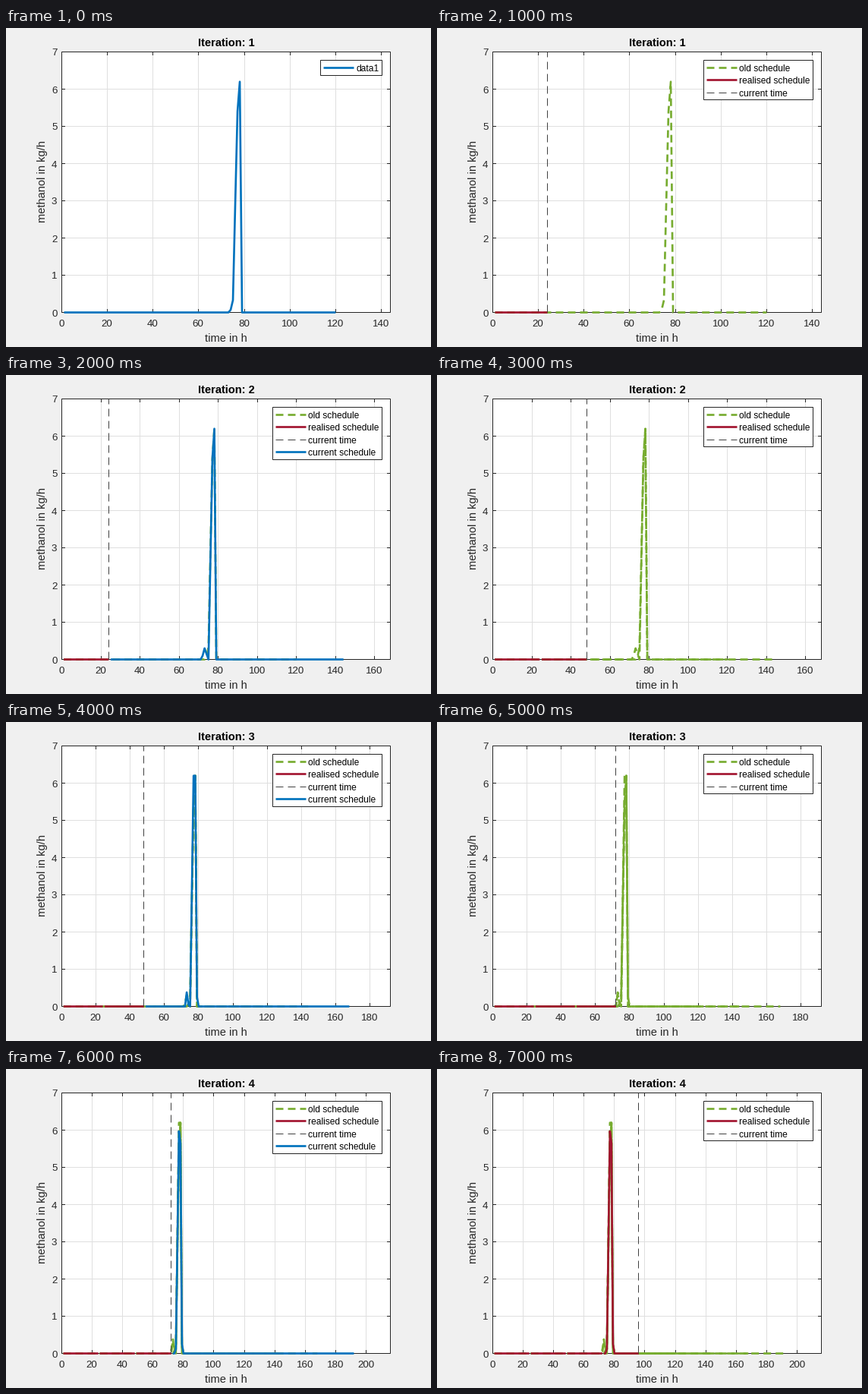
These frames come from a looping animation (560 px wide and 420 px high, 8 s). A matplotlib script:

```python
import math

import matplotlib.pyplot as plt
import numpy as np
from matplotlib.animation import FuncAnimation
from matplotlib.patches import Rectangle

W, H, DPI = 560, 420, 100
LEFT, RIGHT, TOP, BOTTOM = 73.5, 506.5, 31.5, 374.5
Y_MAX = 7
DAY, HORIZON = 24, 120

INK, GRID, TIME_INK = "#262626", "#dfdfdf", "#404040"
BLUE, GREEN, RED = "#0072bd", "#77ac30", "#a2142f"
THICK = 2.67
DASH = (10, 6)

# Non-zero output (hour: kg/h) of each planning round
PEAKS = [
    {74: 0.07, 75: 0.33, 76: 2.9, 77: 5.4, 78: 6.2},
    {72: 0.1, 73: 0.3, 74: 0.15, 76: 2.7, 77: 5.4, 78: 6.2},
    {73: 0.38, 74: 0.05, 76: 3.1, 77: 6.2, 78: 6.2, 79: 0.25},
    {75: 0.12, 76: 3.0, 77: 5.97, 78: 5.65, 79: 0.25},
]

plt.rcParams["font.family"] = "Liberation Sans"
fig = plt.figure(figsize=(W / DPI, H / DPI), dpi=DPI, facecolor="#f0f0f0")
ax = fig.add_axes([0, 0, 1, 1])


def pt(px):
    return px * 72 / DPI


def mid(v):
    """Centre of the pixel that holds v."""
    return math.floor(v) + 0.5


def line(x, y, color, width=1, dashed=False, z=2):
    # Dash lengths are in pixels, whatever the line width
    style = {"dashes": [d / width for d in DASH]} if dashed else {}
    ax.plot(x, y, color=color, lw=pt(width), zorder=z, snap=False,
            solid_capstyle="butt", solid_joinstyle="round",
            dash_joinstyle="round", **style)


def text(x, y, s, size, color=INK, **kw):
    kw = {"ha": "center", "va": "baseline", **kw}
    ax.text(x, y, s, fontsize=pt(size), color=color, zorder=12, **kw)


def box(x0, y0, x1, y1, z):
    ax.add_patch(Rectangle((x0, y0), x1 - x0, y1 - y0, facecolor="white",
                           edgecolor=INK, lw=pt(1), zorder=z, snap=False))


def x_pos(hour, x_max):
    return LEFT + (RIGHT - LEFT) * hour / x_max


def y_pos(value):
    return BOTTOM - (BOTTOM - TOP) * value / Y_MAX


def schedule(k, hours, x_max, color, z, dashed=False):
    start = k * DAY + 1
    t = np.arange(start, start + hours)
    v = np.array([PEAKS[k].get(h, 0) for h in t])
    line(x_pos(t, x_max), y_pos(v), color, THICK, dashed, z)


def draw_axes(x_max, title):
    box(LEFT, TOP, RIGHT, BOTTOM, 0)
    for hour in range(0, x_max, 20):
        x = mid(x_pos(hour, x_max))
        if hour:
            line([x, x], [TOP + 0.5, BOTTOM - 0.5], GRID, z=1)
            line([x, x], [BOTTOM, BOTTOM - 4.5], INK)
            line([x, x], [TOP, TOP + 4.5], INK)
        text(x - 0.5, 393, str(hour), 13.33)
    for value in range(Y_MAX + 1):
        y = mid(y_pos(value))
        if 0 < value < Y_MAX:
            line([LEFT + 0.5, RIGHT - 0.5], [y, y], GRID, z=1)
            line([LEFT, LEFT + 4.5], [y, y], INK)
            line([RIGHT, RIGHT - 4.5], [y, y], INK)
        text(67.5, y + 5, str(value), 13.33, ha="right")
    text(290, 24, title, 14.67, "black", weight="bold")
    text(290, 413, "time in h", 14.67)
    text(52, 202.5, "methanol in kg/h", 14.67, rotation=90,
         rotation_mode="anchor")


def draw_legend(x0, entries):
    box(x0, 42.5, 495.5, mid(62 + 16.4 * (len(entries) - 1)), 10)
    for i, (label, color, width, dashed) in enumerate(entries):
        y = mid(52 + 16.5 * i)
        line([x0 + 4, x0 + 44], [y, y], color, width, dashed, 11)
        text(x0 + 46.5, y + 4.5, label, 12, "black", ha="left")


OLD = ("old schedule", GREEN, THICK, True)
REALISED = ("realised schedule", RED, THICK, False)
NOW = ("current time", TIME_INK, 1, True)
CURRENT = ("current schedule", BLUE, THICK, False)


def draw(i):
    ax.clear()
    ax.set(xlim=(0, W), ylim=(H, 0))
    ax.axis("off")

    # Each round is first planned, then carried out for one day
    k, done = divmod(i, 2)
    x_max = HORIZON + DAY * (k + 1)
    days = k + done
    draw_axes(x_max, f"Iteration: {k + 1}")

    for d in range(days):
        schedule(d, HORIZON, x_max, GREEN, 4, dashed=True)
        schedule(d, DAY, x_max, RED, 5)
    if days:
        x = mid(x_pos(days * DAY, x_max))
        line([x, x], [BOTTOM, TOP], TIME_INK, 1, True, 6)
    if not done:
        schedule(k, HORIZON, x_max, BLUE, 7)

    if not days:
        draw_legend(414.5, [("data1", BLUE, THICK, False)])
    else:
        entries = [OLD, REALISED, NOW]
        draw_legend(351.5, entries if done else entries + [CURRENT])
    return []


anim = FuncAnimation(fig, draw, frames=8, init_func=lambda: [],
                     interval=1000, repeat=True, repeat_delay=0)
plt.show()
```
